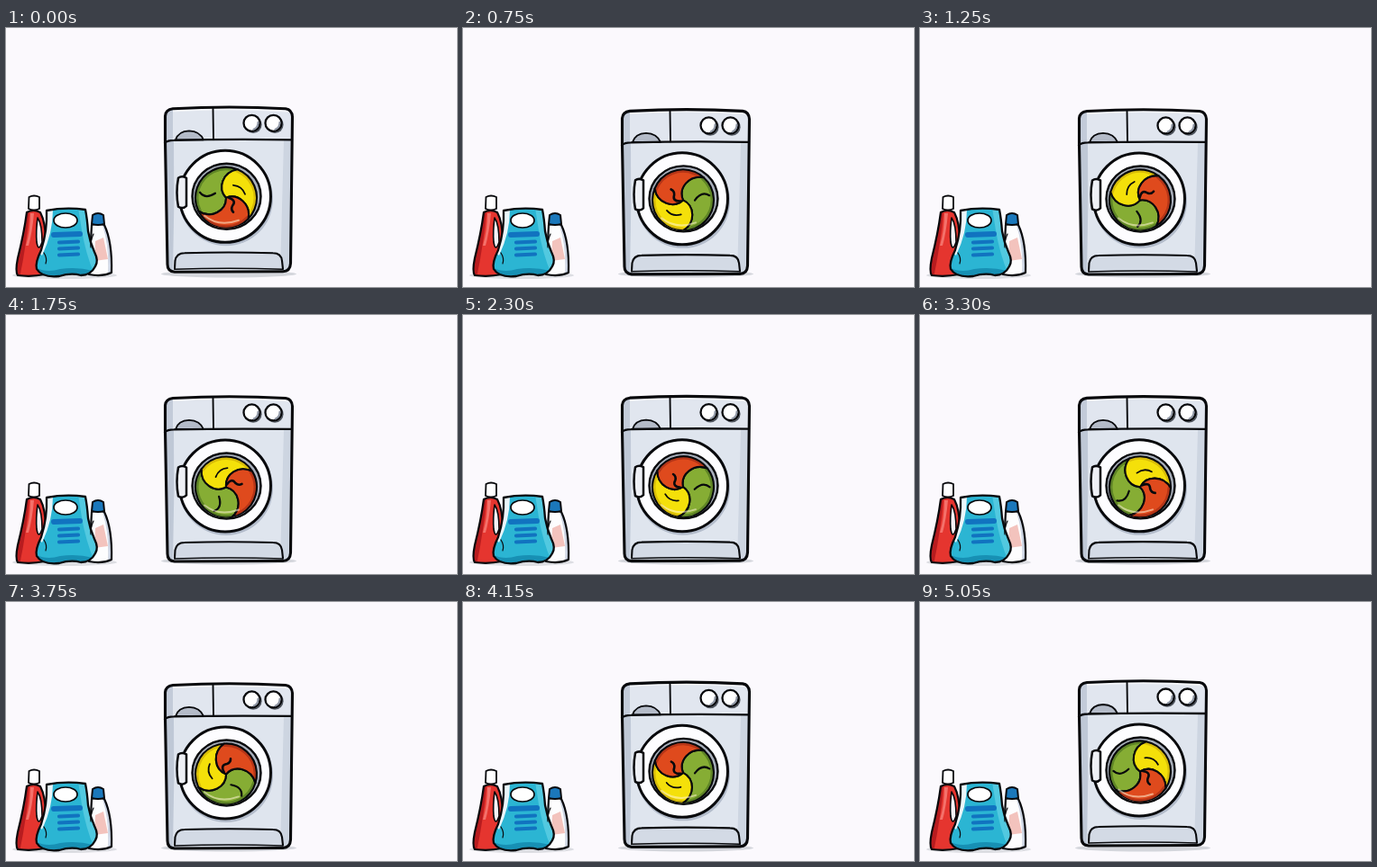
Animation of 500x288 px, one loop 5.1 s. Source, as an HTML page with a canvas:

```html
<!DOCTYPE html>
<html lang="en">
<head>
<meta charset="utf-8">
<title>Washing machine</title>
<style>
html, body { margin: 0; width: 100%; height: 100%; overflow: hidden; background: #fbf9fd; }
canvas { display: block; width: 500px; height: 288px; }
</style>
</head>
<body>
<canvas id="stage"></canvas>
<script>
const canvas = document.getElementById('stage');
const dpr = window.devicePixelRatio || 1;
canvas.width = 500 * dpr;
canvas.height = 288 * dpr;
const ctx = canvas.getContext('2d');
const INK = '#08090c';
const LOOP = 5100, HALF = LOOP / 2, STEP = 50;
const TAU = Math.PI * 2, RAD = Math.PI / 180;

function shape(d, fill, line = 0, color = INK) {
  const p = typeof d === 'string' ? new Path2D(d) : d;
  if (fill) { ctx.fillStyle = fill; ctx.fill(p); }
  if (line) { ctx.lineWidth = line; ctx.strokeStyle = color; ctx.stroke(p); }
}

function oval(x, y, rx, ry, fill, line, color) {
  const p = new Path2D();
  p.ellipse(x, y, rx, ry, 0, 0, TAU);
  shape(p, fill, line, color);
}

function clipped(d, draw) {
  ctx.save();
  ctx.clip(typeof d === 'string' ? new Path2D(d) : d);
  draw();
  ctx.restore();
}

function redBottle() {
  const body = 'M23 205 Q30 201 38 205 Q44 216 44 238 L43 274 Q28 277 13 275 Q10 271 13 256 Q20 228 23 205Z';
  shape(body, '#e5352f');
  clipped(body, () => {
    shape('M9 278 L22 203 L26 203 Q23 240 15 278Z', '#b81c1f');
    shape('M27 206 L31 206 Q29 228 25 242 L22 242 Q27 225 27 206Z', '#f4716a');
  });
  shape(body, null, 2.2);
  shape('M35 211 Q40 218 40 238 Q36 250 34 238 Q33 226 35 211Z', '#f6f3f7', 1.6);
  shape('M25.5 188 Q31 185 37 188 L37 201 Q31 204 25 201Z', '#ffffff', 1.8);
}

function whiteBottle() {
  const body = 'M95 219 Q102 216 109 219 Q118 238 117 272 Q106 277 92 274Z';
  shape(body, '#fdfdfe');
  clipped(body, () => shape('M110 219 Q119 245 118 276 L113 276 Q115 245 107 219Z', '#ccd4e2'));
  shape(body, null, 2.2);
  shape('M99 237 L108 233 L113 257 L98 259Z', '#f3c3bd');
  shape('M96 208 Q102 204 108 208 L109 218 Q102 220 95 218Z', '#1b78bb', 2);
}

function blueBag() {
  const body = 'M45 203 Q66 199 88 202 Q90 212 91 226 Q93 238 98 249 Q103 259 99 265 Q94 275 83 275 Q72 272 59 276 Q40 278 34 268 Q32 261 39 247 Q46 225 45 203Z';
  shape(body, '#2bb5d3');
  clipped(body, () => {
    shape('M80 200 L92 200 Q91 230 104 262 L98 274 Q88 250 84 225Z', '#52c9e0');
    shape('M32 266 Q45 273 60 268 Q78 265 97 270 L96 280 L32 280Z', '#1790b4');
    shape('M44 202 L52 202 Q52 228 40 253 L37 250 Q46 225 44 202Z', '#eaf6fa');
  });
  shape(body, null, 2.3);
  oval(66, 214, 13, 8, '#ffffff', 1.7);
  shape('M53 230 L82 229', null, 6, '#1173c0');
  for (let i = 0; i < 3; i++) {
    shape(`M59 ${238.5 + i * 7} L80 ${237.5 + i * 7}`, null, 4.2, '#1173c0');
  }
  shape('M97 229 Q93 238 94 244 M42 250 Q46 256 44 262', null, 1.2);
}

function products() {
  oval(65, 275, 58, 4, '#dcdde2');
  redBottle();
  whiteBottle();
  blueBag();
}

// Boundary of one wedge: bends clockwise from the hub out to the rim.
function wedge(from, to, r) {
  const at = (a, k) => [Math.cos(a * RAD) * r * k, Math.sin(a * RAD) * r * k];
  const p = new Path2D();
  p.moveTo(0, 0);
  p.bezierCurveTo(...at(from - 65, 0.42), ...at(from - 30, 0.85), ...at(from, 1));
  p.arc(0, 0, r, from * RAD, to * RAD);
  p.bezierCurveTo(...at(to - 30, 0.85), ...at(to - 65, 0.42), 0, 0);
  return p;
}

function laundry(turn) {
  const r = 34;
  ctx.save();
  ctx.translate(244, 190);
  ctx.rotate(turn * RAD);
  const parts = [
    [154, 292, '#86ad34', '#5f8526'],
    [292, 404, '#f4e00a', '#d9bd08'],
    [44, 154, '#df4a1d', '#b53517']
  ];
  for (const [from, to, fill, shade] of parts) {
    const p = wedge(from, to, r);
    shape(p, fill);
    clipped(p, () => {
      ctx.beginPath();
      ctx.arc(0, 0, r - 1, from * RAD, to * RAD);
      ctx.lineWidth = 5;
      ctx.strokeStyle = shade;
      ctx.stroke();
    });
    shape(p, null, 2.1);
  }
  shape('M-29 -6 Q-23 2 -12 -5', null, 2.2);
  shape('M3 0 Q12 3 7 9 Q5 13 8 16', null, 2.6);
  shape('M8 -14 Q18 -13 21 -4', null, 1.8);
  ctx.restore();
}

function door(turn) {
  oval(244, 191.5, 52, 52, '#b3bccb');
  oval(243, 188.5, 50.5, 51, '#fdfdff', 3);
  oval(244.5, 188.5, 38, 36.5, '#a9b0bc', 2.4);
  const hole = new Path2D();
  hole.ellipse(244.5, 188.5, 37, 35.5, 0, 0, TAU);
  clipped(hole, () => {
    laundry(turn);
    shape('M220 210 Q236 223 258 215', null, 2, 'rgba(255,245,215,.55)');
  });
  shape('M191 168 Q195 165 200 168 L200 199 Q196 203 191 200 Q188 184 191 168Z', '#eef0f5', 2.5);
}

function knob(x, y) {
  oval(x + 1.6, y + 1.8, 9.5, 9.5, '#50565f');
  oval(x, y, 9, 9, '#ffffff', 2.3);
  shape(`M${x + 2} ${y + 7} Q${x + 7} ${y + 5} ${x + 7} ${y - 1}`, null, 2, '#8d95a3');
}

function machine(turn, lift) {
  const body = 'M176.5 99 Q177 92 185 91 Q248 87.5 310 91 Q317 92 317.5 100 L315.5 263 Q315 272 307 272 L187 272.5 Q179 272 179 264 L176.5 128Z';
  oval(247, 273.5, 75, 4, '#d4d6dc');
  ctx.save();
  ctx.translate(0, -lift);
  shape(body, '#dfe5ee');
  clipped(body, () => {
    shape('M176 87 H320 V126 H176Z', '#e1e6ef');
    shape('M178 95 Q246 90 316 95 L316 88 L178 88Z', '#f4f6fa');
    shape('M176 92 H185 V126 H176Z', '#c3cbd9');
    shape('M308 126 H320 V275 H304Z', '#cdd5e1');
    shape('M176 127 H186 Q187 200 185 272 H176Z', '#bfc8d6');
  });

  shape('M188 125.5 Q191 116 203 115.5 Q215 116 219 125.5Z', '#b4bbc8', 1.8);
  shape('M229.5 91 L230 125', null, 1.9);
  shape('M176 129 Q179 126 186 126 Q248 124.5 317 125.5', null, 2.3);
  knob(272.5, 107);
  knob(296.5, 107);

  const edge = 'M187 269 L187.5 260 Q189 251.5 198 251.5 Q247 250 296 251.5 Q305 251.5 306 260 L307 269';
  shape(edge + 'Z', '#d3dae5');
  shape(edge, null, 2.1);
  shape('M187 269.5 Q247 267.5 307 269.5', null, 1.5);
  shape(body, null, 3.1);
  door(turn);
  ctx.restore();
}

function draw(time) {
  const t = Math.floor(time % LOOP / STEP) * STEP;
  const s = (t + 1000) % LOOP;
  const swing = s < HALF ? s : LOOP - s;
  const turn = (swing - 1000) * 0.211;
  const lift = 1.5 * Math.cos((t + STEP) / LOOP * 10 * TAU);

  ctx.setTransform(dpr, 0, 0, dpr, 0, 0);
  ctx.fillStyle = '#fbf9fd';
  ctx.fillRect(0, 0, 500, 288);
  ctx.lineCap = ctx.lineJoin = 'round';
  products();
  machine(turn, lift);
}

let start = null;
function tick(now) {
  if (start === null) start = now;
  draw(now - start);
  requestAnimationFrame(tick);
}
draw(0);
requestAnimationFrame(tick);
</script>
</body>
</html>
```
